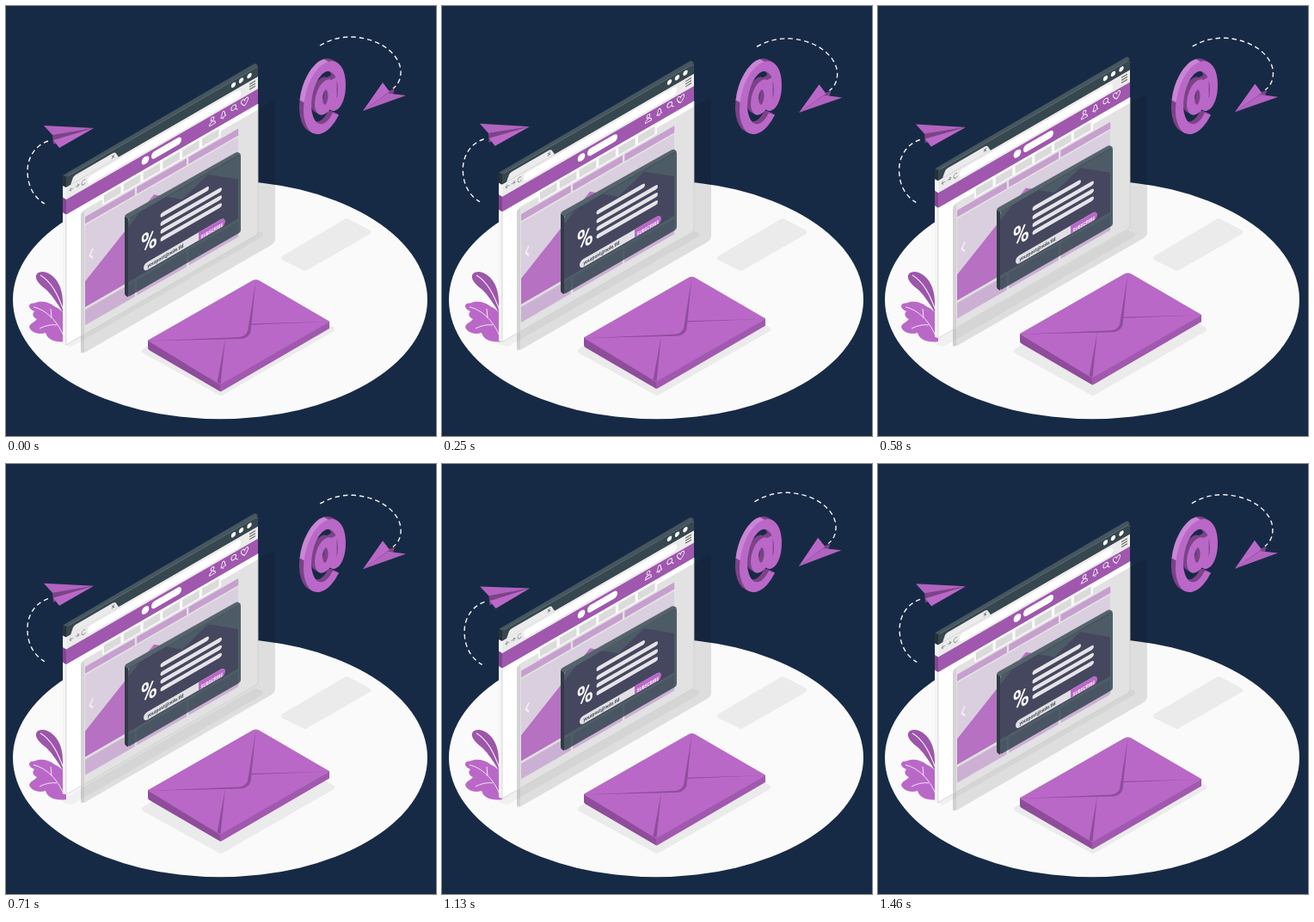
These frames come from a looping animation (500x500 px, 1.5 s). An HTML page:

```html
<!DOCTYPE html>
<html lang="en">
<head>
<meta charset="utf-8">
<title>Newsletter</title>
<style>
  html, body { margin: 0; width: 100%; height: 100%; overflow: hidden; background: #172a45; }
  svg { display: block; width: 100vw; height: 100vh; }
  text { font-family: Roboto, sans-serif; font-weight: 700; }
</style>
</head>
<body>
<svg viewBox="0 0 500 500">
  <rect width="500" height="500" fill="#172a45"/>
  <ellipse cx="249" cy="341.5" rx="241" ry="138.700" fill="#fafafa"/>

  <!-- floor shadows -->
  <g fill="#ebebeb" stroke="#ebebeb" stroke-width="6" stroke-linejoin="round">
    <path d="M323 293 396 250 421 263 348 305Z"/>
    <path d="M161 401 290 328 379 376 250 450Z"/>
    <path d="M69 391 290 264 296 266 76 393Z" fill="#f0f0f0" stroke="#f0f0f0"/>
  </g>

  <!-- plant -->
  <path d="M36 319C33 313 36 309 43 309C57 311 66 326 66 344V356C60 346 54 337 47 330C42 326 38 323 36 319Z" fill="#9c56aa"/>
  <path d="M40 313C53 321 60 335 67 354" fill="none" stroke="#f3e5f5" stroke-width="1.100"/>
  <path d="M33 355C25 352 25 345 33 345.500C40 342 50 344 56 349C62 352 66 355 70 361V390C58 392 48 388 46 380C36 383 28 378 27 373C29 368 33 368 36 364C31 362 30 358 33 355Z" fill="#ba68c8"/>
  <path d="M32 350C46 353 60 366 67 384M53 363 52 352M59 371C52 370 45 372 39 375" fill="none" stroke="#f3e5f5" stroke-width="1"/>

  <g id="win"><g transform="translate(0 1)">
    <!-- frame thickness -->
    <path d="M66 196 288 66.500Q291 65 293 69L70 198Z" fill="#45565e"/>
    <path d="M66 195.700 70 198V210L66 208Z" fill="#263238"/>
    <path d="M66 208 70 210V393L66 391.500Z" fill="#f4f4f4"/>
    <path d="M66 221.500 70 224V241.500L66 239Z" fill="#83468f"/>
    <g transform="matrix(1 -.577 0 1 70 198)">
      <rect width="223" height="195" rx="3" fill="#fff"/>
      <path d="M0 12V0H220Q223 0 223 3V12Z" fill="#37474f"/>
      <path d="M5 12 8 5Q9 3.500 11 3.500H54Q57 3.500 58 6L61 12Z" fill="#ebebeb"/>
      <path d="M0 12H223V26H0Z" fill="#ebebeb"/>
      <rect x="25" y="14.500" width="178" height="9" rx="4" fill="#fff"/>
      <path d="M53 6 56 9.500M56 6 53 9.500" stroke="#666" stroke-width=".8"/>
      <g fill="none" stroke="#8b8b8b" stroke-width=".8">
        <path d="M8.500 17.500H4M6 15.500 4 17.500 6 19.500M10.500 17.500H15M13 15.500 15 17.500 13 19.500"/>
        <path d="M22 16A2.200 2.700 0 1 0 22.300 19"/>
        <path d="M213 15H220M213 18H220M213 21H220" stroke="#666" stroke-width="1.200"/>
      </g>
      <g fill="#fff">
        <circle cx="194.500" cy="5" r="2.700"/><circle cx="203.500" cy="5" r="2.700"/><circle cx="213" cy="5" r="2.700"/>
      </g>
      <path d="M0 26H223V43.500H0Z" fill="#9f58ad"/>
      <g fill="#fff">
        <circle cx="92" cy="33.500" r="4.300"/>
        <rect x="99" y="29" width="35" height="8.600" rx="4.300"/>
      </g>
      <g fill="none" stroke="#fff" stroke-width=".85">
        <circle cx="170" cy="30.500" r="1.900"/><path d="M166.500 37Q166.500 33.500 170 33.500T173.500 37Z"/>
        <path d="M179.500 35.500Q181 35 181 32Q181 29 182.500 29T184.500 32Q184.500 35 186 35.500ZM181.500 37H183.500"/>
        <circle cx="194.700" cy="31.500" r="2.800"/><path d="M197 34 199.500 36.500"/>
        <path d="M207.500 36.500C202 32 203 28 205.500 28.500Q207 28.800 207.500 30.500Q208 28.800 209.500 28.500C212 28 213 32 207.500 36.500Z"/>
      </g>
      <!-- cast shade -->
      <rect x="17" y="50" width="226" height="166.500" rx="5" fill="#000" opacity=".115"/>
      <path d="M17 52H21V215H17Z" fill="#888" opacity=".16"/>
      <path d="M0 43.500V195H220Q223 195 223 192V43.500" fill="none" stroke="#cfcfcf" stroke-width=".7"/>
      <g id="menu"></g>
      <!-- page -->
      <path d="M22 69H200V164H22Z" fill="#dacfde"/>
      <path d="M22 134 102 79 135 104 165 92 200 118V164H22Z" fill="#b671c2"/>
      <g id="cols"></g>
      <path d="M31 101 27.500 107 31 112" fill="none" stroke="#f5eef6" stroke-width="1.800"/>
    </g>

    <!-- popup -->
    <path d="M138 245Q138 242 140 241L267 169.500Q270 168 273 171.500L142 247Z" fill="#56636c"/>
    <path d="M138 244 142 246.500V337.500L139.500 336Q138 335 138 333Z" fill="#303b45"/>
    <g transform="matrix(1 -.577 0 1 142 246.500)">
      <rect width="131" height="91" rx="2.500" fill="#263b45" opacity=".78"/>
      <g stroke="#e6e4e8" stroke-width="5" stroke-linecap="round">
        <path d="M40 18.200H91.500M40 28.200H106.500M40 37.200H106.500M40 46.200H106.500"/>
      </g>
      <rect x="18" y="63" width="94.500" height="9.400" rx="4.700" fill="#e2e0e4"/>
      <path d="M82 63H108A4.700 4.700 0 0 1 108 72.400H82Z" fill="#ba68c8"/>
    </g>
    <g fill="#fff">
      <text transform="matrix(.866 -.5 0 1 156.500 288)" font-size="30.500">%</text>
      <text transform="matrix(.866 -.5 0 1 226.500 269.700)" font-size="5.600">SUBSCRIBE</text>
      <text transform="matrix(.866 -.5 0 1 164.500 303.500)" font-size="5.900" fill="#37474f">yourpost@nole.tld</text>
    </g>
  </g></g>

  <!-- envelope -->
  <g id="mail">
    <path d="M165 389 249 440V448.300L167 400.500Q165 399.500 165 397.500Z" fill="#8e4c9b"/>
    <path d="M249 440 376 367V375L251 447.800Q250 448.300 249 448.300Z" fill="#a158af"/>
    <path d="M165 389 287 319.300Q290.500 317.500 294 319.300L376 367 249 440.500Z" fill="#ba68c8"/>
    <g fill="#8f4d9c">
      <path d="M165 389.500 271 385Q279 384 281 378L290.500 319 284.500 379Q282 386 273 387Z"/>
      <path d="M376 367 284 370.800 284.500 369.600Z"/>
      <path d="M255 386.500 245.500 438 249.500 439.500Z"/>
    </g>
    <path d="M165 389 287 319.300Q290.500 317.500 294 319.300L376 367 249 440.500Z" fill="none" stroke="#9c56aa" stroke-width=".5"/>
  </g>

  <g id="at" fill="none" stroke-width="10.500" stroke-linejoin="round"></g>

  <!-- planes and trails -->
  <g id="air">
    <g fill="none" stroke="#f5f5f5" stroke-width="1.400" stroke-dasharray="5.500 4">
      <path d="M49 157C34 162 25 176 25 192C25 210 33 223 45 230"/>
      <path d="M365 46C378 38 392 35.500 404 36C440 38.500 460 60 459 78C458.500 87 455 92 450 96"/>
    </g>
    <path d="M54 149 102 142 55 161Z" fill="#7c4387"/>
    <path d="M44 139 102 142 54 150Z" fill="#b163bf"/>
    <path d="M55 156 102 142 62 165Z" fill="#ba68c8"/>
    <path d="M415 122 445 99 452 96 449 106Z" fill="#7c4387"/>
    <path d="M415 122 438 89 446 99.500Z" fill="#ba68c8"/>
    <path d="M415 122 444 101.500 465 104Z" fill="#b163bf"/>
  </g>
</svg>
<script>
const LOOP = 1500;
const $ = id => document.getElementById(id);
const rect = (x, y, w, h, fill) =>
  `<rect x="${x}" y="${y}" width="${w}" height="${h}" fill="${fill}"/>`;

// menu buttons and page columns
let menu = rect(42, 44, 138, 13, '#fafafa');
for (let i = 0; i < 6; i++) menu += rect(44 + i * 22.8, 46.5, 19.5, 9, '#dadbda');
$('menu').innerHTML = menu;
for (let i = 0; i < 3; i++) {
  const x = 22 + i * 60.2;
  $('cols').innerHTML += rect(x, 59, 57.8, 8, '#c79fcf') + rect(x, 164, 57.8, 3, '#dedede') +
    rect(x, 167, 57.8, 18, '#ccb0d3');
}

// extruded "at" sign, back layers first
const ring = 'M15 26.4A23 34.8 0 1 1 23 0C23 12 19 18 15 17Q11 16 11 9V-16M10 0A9 14 0 1 1 -8 0A9 14 0 1 1 10 0';
const lit = 'M-22.5 -7A23 34.8 0 0 1 4 -34.3';
const layer = (d, k, color) =>
  `<path d="${d}" stroke="${color}" transform="matrix(.866 -.5 0 1 ${370.5 - 5 * k} ${106.5 - 2.9 * k})"/>`;
let sign = '';
for (let k = 1; k > 0; k -= 0.125) sign += layer(ring, k, '#7c4387');
for (let k = 1; k > 0; k -= 0.125) sign += layer(lit, k, '#cb86d6');
$('at').innerHTML = sign + layer(ring, 0, '#ba68c8');

function draw(ms) {
  const p = ms % LOOP / LOOP;
  const lift = -10 * (1 - Math.abs(1 - 2 * p));
  const sway = p < 0.25 ? 4 * p : p < 0.75 ? 2 - 4 * p : 4 * p - 4;
  for (const id of ['win', 'mail']) $(id).setAttribute('transform', `translate(0 ${lift})`);
  $('air').setAttribute('transform', `rotate(${sway} 244 133)`);
}

const start = performance.now();
function tick() {
  draw(performance.now() - start);
  requestAnimationFrame(tick);
}
tick();
</script>
</body>
</html>
```
